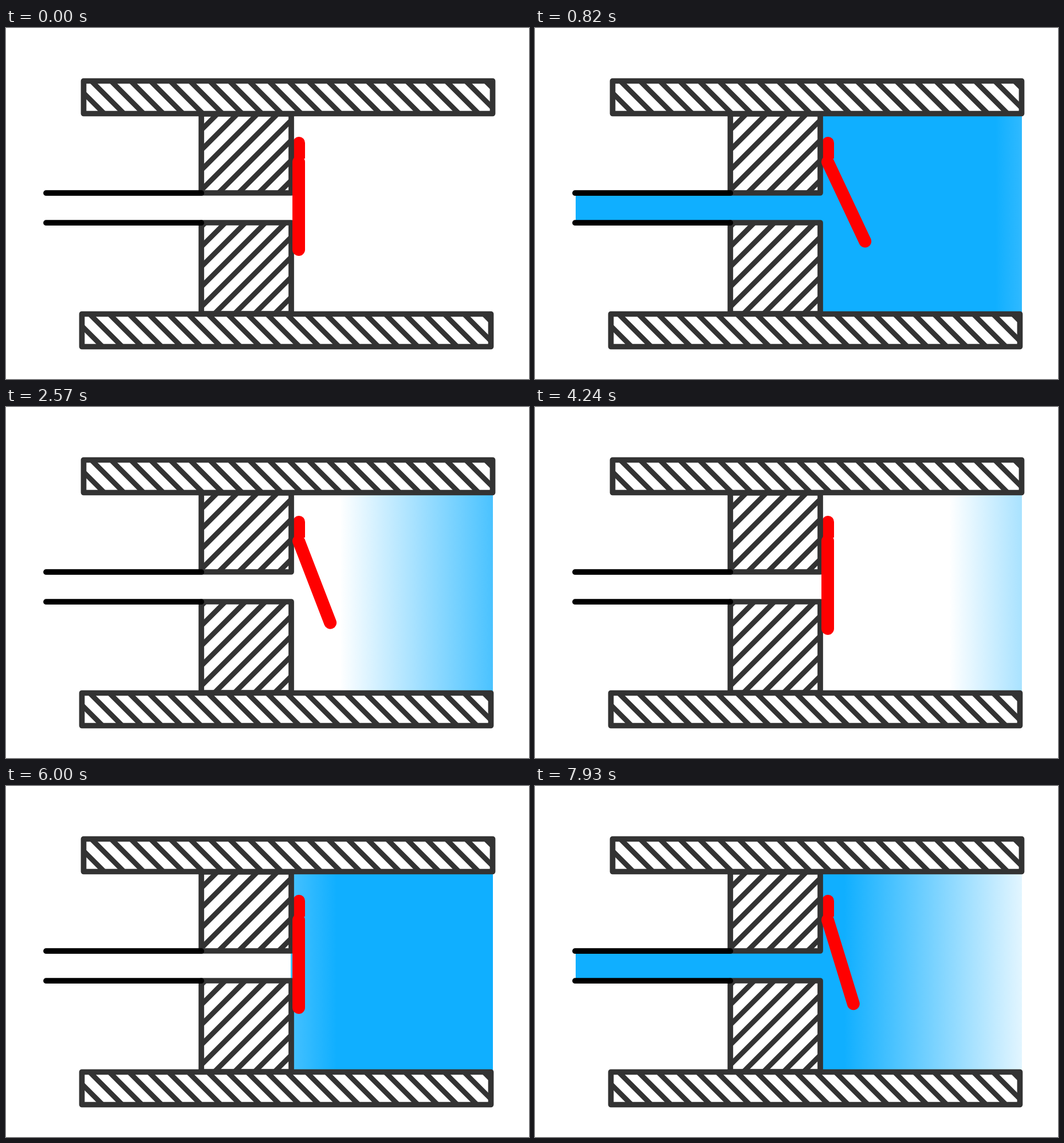
Write an HTML page that moves like this. It is 913 by 613 pixels and loops after 8000 ms.

```html
<!DOCTYPE html>
<html lang="en">
<head>
<meta charset="utf-8">
<title>Check valve</title>
<style>
  html, body { margin: 0; width: 100%; height: 100%; overflow: hidden; background: #fff; }
  svg { display: block; width: 100vw; height: 100vh; }
  .steel { stroke: #333; stroke-width: 9.7; stroke-linejoin: round; fill: none; }
  .hatch { stroke: #333; stroke-width: 9; }
  .pipe { stroke: #000; stroke-width: 9.8; stroke-linecap: round; }
</style>
</head>
<body>
<svg viewBox="0 0 913 613">
  <defs id="defs"></defs>
  <g id="water"></g>
  <path d="M501 228V200.500a10.500 10.500 0 0 1 21 0V228z" fill="#f00"/>
  <g id="walls"></g>
  <path class="pipe" d="M70 288.200H341M70 340.200H341"/>
  <path id="flap" d="M511 234V387" stroke="#f00" stroke-width="22" stroke-linecap="round"/>
</svg>
<script>
const LOOP = 8000, BLUE = '#10afff', MAX_ANGLE = 25.2;
const $ = id => document.getElementById(id);

function add(parent, tag, attrs) {
  const el = document.createElementNS('http://www.w3.org/2000/svg', tag);
  for (const k in attrs) el.setAttribute(k, attrs[k]);
  parent.append(el);
  return el;
}

// A hatched wall; lines pass through (first + k * gap, y) and lean by dir.
function wall(id, x, y, w, h, first, gap, dir) {
  const box = { x, y, width: w, height: h };
  add(add($('defs'), 'clipPath', { id }), 'rect', box);
  add($('walls'), 'rect', { ...box, fill: '#fff' });
  let d = '';
  for (let k = -6; k < 22; k++) {
    d += `M${first + k * gap - dir * 10} ${y - 10}l${dir * (h + 20)} ${h + 20}`;
  }
  add($('walls'), 'path', { d, class: 'hatch', 'clip-path': `url(#${id})` });
  add($('walls'), 'rect', { ...box, class: 'steel' });
}

wall('blockTop', 341, 150, 157, 138, 369, 35, -1);
wall('blockLow', 341, 340, 157, 159, 383, 35, -1);
wall('barTop', 135.5, 92.5, 714, 57, 183.3, 34.4, 1);
wall('barLow', 132.5, 499.5, 714, 57, 180.3, 34.4, 1);

// Water revealed or removed by a soft-edged wipe as wide as the region.
function makeWater(id, x, y, w, h) {
  const grad = add($('defs'), 'linearGradient', { id, gradientUnits: 'userSpaceOnUse', y1: 0, y2: 0 });
  const stops = [0, 1].map(offset => add(grad, 'stop', { offset, 'stop-color': BLUE }));
  add($('water'), 'rect', { x, y, width: w, height: h, fill: `url(#${id})` });
  return (p, wetLeft) => {
    const edge = x - w + 2 * w * p;
    grad.setAttribute('x1', edge);
    grad.setAttribute('x2', edge + w);
    stops[0].setAttribute('stop-opacity', wetLeft ? 1 : 0);
    stops[1].setAttribute('stop-opacity', wetLeft ? 0 : 1);
  };
}

const setPipe = makeWater('pipeWater', 71, 288, 426, 52);
const setChamber = makeWater('chamberWater', 497, 150, 353, 349);

const ramp = (t, a, b) => Math.min(1, Math.max(0, (t - a) / (b - a)));

function pose(pipe, pipeWetLeft, chamber, chamberWetLeft, angle) {
  setPipe(pipe, pipeWetLeft);
  setChamber(chamber, chamberWetLeft);
  $('flap').setAttribute('transform', `rotate(${-angle} 511 234)`);
}

const still = () => pose(0, true, 0, true, 0);
const fill = t => pose(ramp(t, 20, 520), true, ramp(t, 220, 862), true,
  MAX_ANGLE * ramp(t, 80, 820));
const drain = t => pose(ramp(t, 2020, 2520), false, ramp(t, 2167, 2810), false,
  MAX_ANGLE * (1 - ramp(t, 2506, 2878)));
const backFill = t => pose(0, true, 1 - ramp(t, 4150, 4650), false, 0);
const backDrain = t => pose(0, true, ramp(t, 5940, 6470), false, 0);

// start, end, number of steps, pose
const phases = [
  [0, 0, 1, still],
  [80, 820, 10, fill],
  [2080, 2810, 10, drain],
  [2900, 2900, 1, still],
  [4240, 4670, 6, backFill],
  [6000, 6500, 7, backDrain],
  [7430, 7930, 7, t => fill(t - 7350)]
];

function draw(t) {
  const [start, end, count, show] = phases.filter(p => p[0] <= t).pop();
  const step = count > 1 ? (end - start) / (count - 1) : 1;
  const n = Math.min(count - 1, Math.floor((t - start) / step + 1e-6));
  show(start + n * step);
}

const begin = performance.now();
function frame() {
  draw((performance.now() - begin) % LOOP);
  requestAnimationFrame(frame);
}
frame();
</script>
</body>
</html>
```
